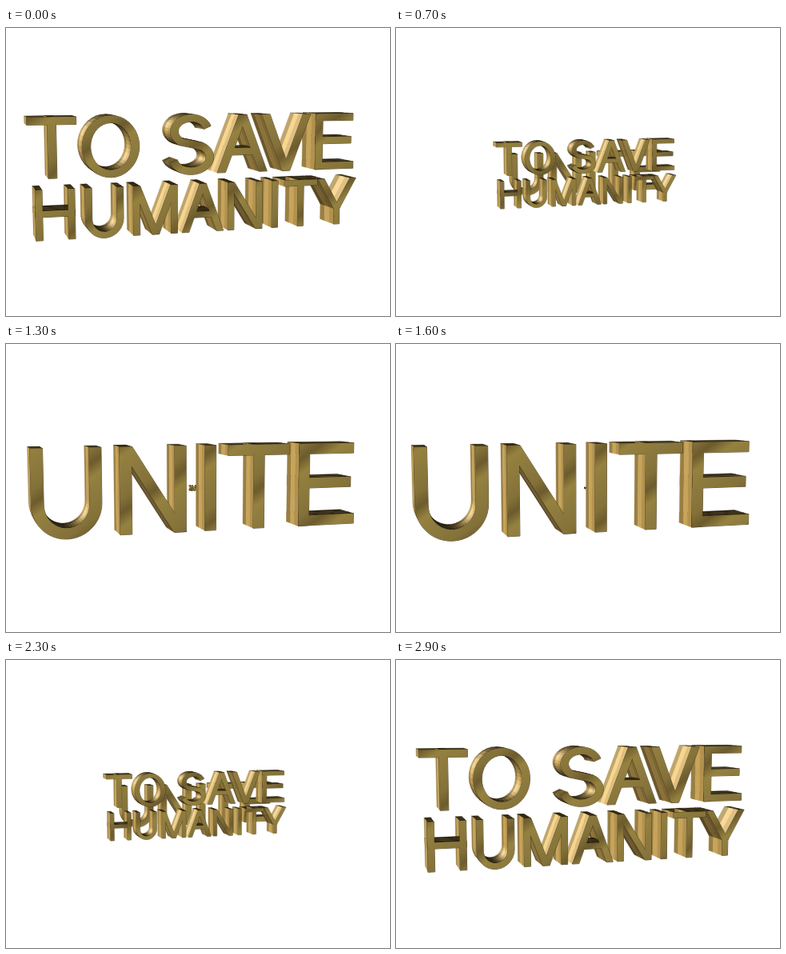
Write an HTML page that moves like this. It is 480 px wide and 360 px high and loops after 3000 ms.

```html
<!DOCTYPE html>
<html lang="en">
<head>
<meta charset="utf-8">
<style>
html, body { margin: 0; width: 100%; height: 100%; overflow: hidden; background: #fff; }
svg { display: block; width: 100vw; height: 100vh; }
</style>
</head>
<body>
<svg viewBox="0 0 480 360" role="img" aria-label="UNITE TO SAVE HUMANITY">
  <defs>
    <linearGradient id="face" gradientUnits="userSpaceOnUse" x1="0" y1="0" x2="42" y2="60" spreadMethod="repeat">
      <stop offset="0" stop-color="#8b793d"/>
      <stop offset=".3" stop-color="#837139"/>
      <stop offset=".5" stop-color="#6c5b2d"/>
      <stop offset=".7" stop-color="#95813f"/>
      <stop offset="1" stop-color="#8b793d"/>
    </linearGradient>
  </defs>
  <g id="scene"></g>
</svg>
<script>
const LOOP = 3000, STEP = 100, RAD = Math.PI / 180;
const CX = 237.5, CY = 180, CAM = 950, DEPTH = 40, BANDS = 3;
const YAW = 16.5 * RAD, PITCH = 6.6 * RAD;
const cy = Math.cos(YAW), sy = Math.sin(YAW), cp = Math.cos(PITCH), sp = Math.sin(PITCH);

// Letters are built from clockwise strokes (y up, unit one em).
const CAP = 0.716, STEM = 0.1, BAR = 0.088, DIAG = 0.108;
const LEFT = 0.074, RIGHT = 0.645, MID = 0.33, AXIS = 0.359;

const slant = (x0, y0, x1, y1, w) => [[x0, y0], [x1, y1], [x1 + w, y1], [x0 + w, y0]];
const stem = (x, top = CAP) => slant(x, 0, x, top, STEM);
const leg = (foot, head) => slant(foot, 0, head, CAP, DIAG);
const bar = (x0, x1, y) => slant(x0, y, x0, y + BAR, x1 - x0);

function arc(x, y, rx, ry, from, to, count = 24) {
  return Array.from({ length: count + 1 }, (_, i) => {
    const a = (from + (to - from) * i / count) * RAD;
    return [x + rx * Math.cos(a), y + ry * Math.sin(a)];
  });
}
// Thickens a centre line into a closed outline.
function sweep(mid) {
  const edge = side => mid.map(([x, y], i) => {
    const [ax, ay] = mid[Math.max(0, i - 1)], [bx, by] = mid[Math.min(mid.length - 1, i + 1)];
    const dx = bx - ax, dy = by - ay, f = side / 2 / Math.hypot(dx, dy);
    return [x - dy * f * STEM, y + dx * f * BAR];
  });
  return [...edge(1), ...edge(-1).reverse()];
}

const half = RIGHT - AXIS - STEM / 2, far = RIGHT - STEM;
const glyphs = {
  ' ': [0.278, []],
  T: [0.611, [bar(0.021, 0.59, CAP - BAR), stem(0.305 - STEM / 2)]],
  E: [0.667, [stem(LEFT), bar(LEFT, 0.606, CAP - BAR), bar(LEFT, 0.582, MID), bar(LEFT, 0.62, 0)]],
  I: [0.278, [stem(0.139 - STEM / 2)]],
  H: [0.722, [stem(LEFT), stem(far), bar(LEFT, RIGHT, MID)]],
  U: [0.722, [sweep([[AXIS - half, CAP], ...arc(AXIS, 0.27, half, 0.238, 180, 360), [AXIS + half, CAP]])]],
  N: [0.722, [stem(LEFT), leg(RIGHT - DIAG, LEFT), stem(far)]],
  M: [0.833, [stem(LEFT), leg(0.363, LEFT), leg(0.363, 0.651), stem(0.659)]],
  A: [0.667, [leg(0, 0.28), leg(0.559, 0.28), bar(0.16, 0.5, 0.215)]],
  V: [0.667, [leg(0.28, 0), leg(0.28, 0.559)]],
  Y: [0.667, [stem(0.284, 0.3), slant(0.28, 0.25, 0, CAP, DIAG), slant(0.28, 0.25, 0.559, CAP, DIAG)]],
  O: [0.778, [arc(AXIS + 0.03, 0.358, 0.345, 0.37, 360, 0, 36), arc(AXIS + 0.03, 0.358, 0.345 - STEM, 0.37 - BAR, 0, 360, 36)]],
  S: [0.667, [sweep([...arc(0.33, 0.524, 0.215, 0.16, 15, 235), ...arc(0.335, 0.199, 0.235, 0.167, 55, -165)])]]
};

// Lays out a line so that its ink is `width` wide, centred at mid; far letters come first.
function line(text, width, height, base, mid) {
  const row = [];
  let pen = 0;
  [...text].forEach((ch, i) => {
    if (ch === 'V' && text[i - 1] === 'A') pen -= 0.074;
    const [adv, parts] = glyphs[ch];
    row.unshift(parts.map(c => c.map(([x, y]) => [x + pen, y])));
    pen += adv;
  });
  const xs = row.flat(2).map(p => p[0]);
  const lo = Math.min(...xs), f = width / (Math.max(...xs) - lo);
  return row.map(g => g.map(c => c.map(([x, y]) => [(x - lo) * f - width / 2 + mid, y / CAP * height + base])));
}

const slogan = [...line('TO SAVE', 414, 71, 0.5, 0), ...line('HUMANITY', 411, 59.5, -72, 6)];
const word = line('UNITE', 432, 110, -53.5, 3);

function project(x, y, z, s) {
  const X = (x * cy + z * sy) * s, Z = (z * cy - x * sy) * s, Y = y * s;
  const p = CAM / (CAM - Z * cp - Y * sp);
  return [CX + X * p, CY - (Y * cp - Z * sp) * p];
}

// Side colour: gold light from the left plus a cream glint from the upper left.
function tone(angle, gain) {
  const lit = Math.max(0, Math.cos(angle - 162 * RAD)) ** 2;
  const glint = Math.max(0, Math.cos(angle - 150 * RAD)) ** 14;
  const mix = (dark, gold, cream) => Math.min(255, Math.round((dark + gold * lit + cream * glint) * gain));
  return `rgb(${mix(36, 165, 45)},${mix(28, 136, 50)},${mix(12, 72, 62)})`;
}

const path = p => 'M' + p.map(v => v[0].toFixed(2) + ' ' + v[1].toFixed(2)).join('L') + 'Z';
function area(p) {
  return p.reduce((sum, [x, y], i) => {
    const [u, v] = p[(i + 1) % p.length];
    return sum + x * v - u * y;
  }, 0);
}

function drawSide(a, b, s) {
  const quad = (z0, z1) => [project(...a, z1, s), project(...b, z1, s), project(...b, z0, s), project(...a, z0, s)];
  if (area(quad(-DEPTH / 2, DEPTH / 2)) >= 0) return '';
  const angle = Math.atan2(b[0] - a[0], a[1] - b[1]);
  let svg = '';
  for (let n = 0; n < BANDS; n++) {
    const z = DEPTH * (n / BANDS - 0.5), col = tone(angle, 0.8 + 0.25 * Math.sin(n * 1.3));
    svg += `<path d="${path(quad(z, z + DEPTH / BANDS))}" fill="${col}" stroke="${col}" stroke-width=".4"/>`;
  }
  return svg;
}

function drawLetter(parts, s) {
  const sides = parts.flatMap(c => c.map((a, i) => [a, c[(i + 1) % c.length]]))
    .sort((e, f) => f[0][0] + f[1][0] - e[0][0] - e[1][0])
    .map(([a, b]) => drawSide(a, b, s)).join('');
  const face = parts.map(c => path(c.map(p => project(...p, DEPTH / 2, s)))).join('');
  return `${sides}<path d="${face}" fill="url(#face)" stroke="#33270d" stroke-opacity=".75" stroke-width="${0.4 + 0.6 * s}" paint-order="stroke"/>`;
}
const drawText = (letters, s) => s < 0.002 ? '' : letters.map(g => drawLetter(g, s)).join('');

const scene = document.getElementById('scene');
let shown = -1;
function render(ms) {
  const step = Math.floor(ms % LOOP / STEP);
  if (step === shown) return;
  shown = step;
  const s = (1 + Math.cos(2 * Math.PI * step * STEP / LOOP)) / 2;
  const a = drawText(slogan, s), b = drawText(word, 1 - s);
  scene.innerHTML = s > 0.5 ? b + a : a + b;
}

const begin = performance.now();
function tick() {
  render(performance.now() - begin);
  requestAnimationFrame(tick);
}
tick();
</script>
</body>
</html>
```
